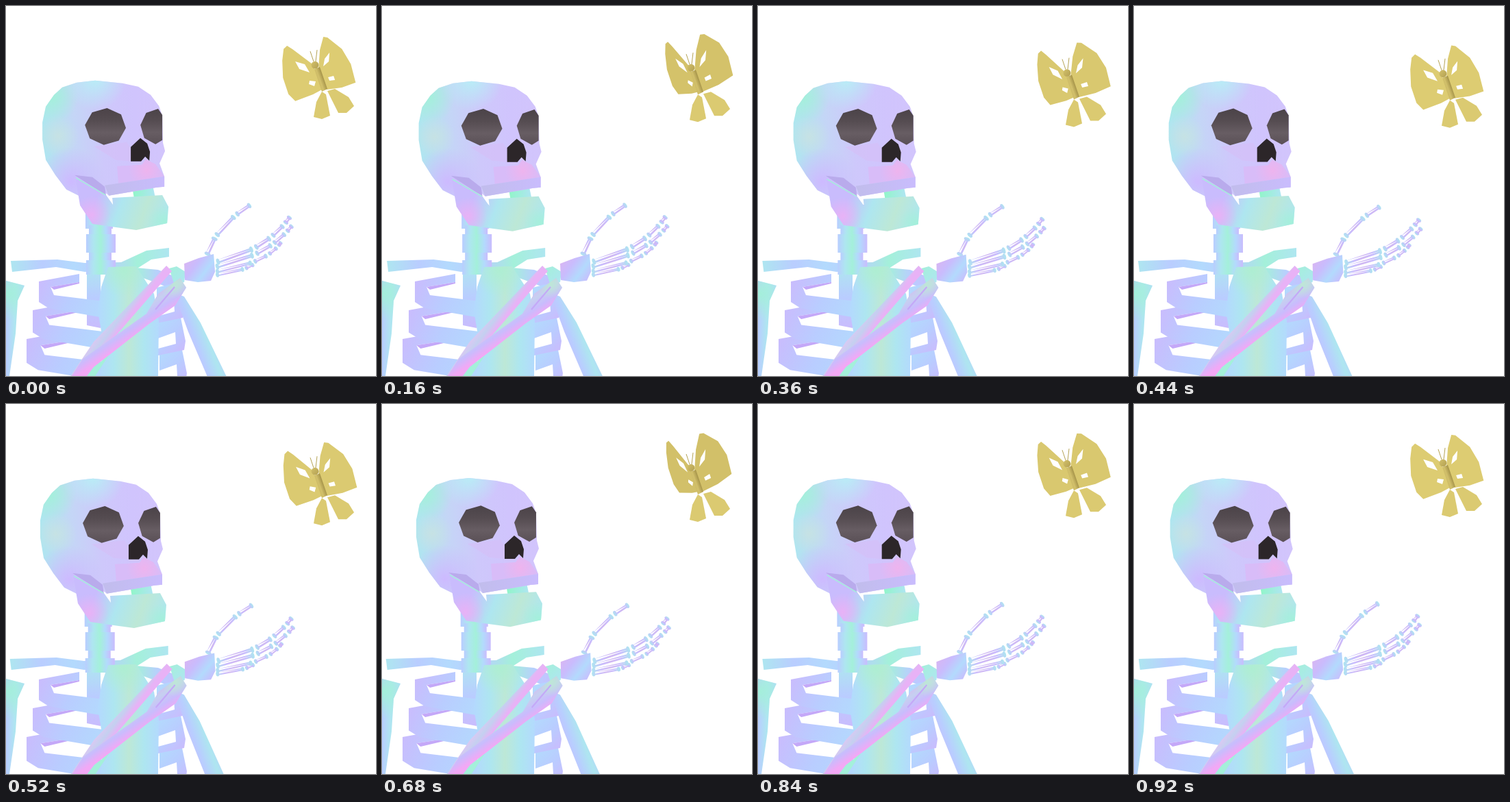
Animation of 540x540 px, one loop 0.96 s. Source, as an HTML page with a canvas:

```html
<!DOCTYPE html>
<html lang="en">
<head>
<meta charset="utf-8">
<title>Skeleton and butterfly</title>
<style>
  html, body { margin: 0; width: 100%; height: 100%; overflow: hidden; background: #fff; }
  canvas { display: block; width: 540px; height: 540px; }
</style>
</head>
<body>
<canvas id="stage" width="540" height="540"></canvas>
<script>
const ctx = document.getElementById('stage').getContext('2d');
const LOOP = 960, STEP = 40, TAU = 2 * Math.PI;
const mint = '#a4f0da', cyan = '#aee6f0', sky = '#b3dafd', blue = '#b9cdff',
  lilac = '#c9bcfd', violet = '#c4a8f8', pink = '#e8b2f6', sage = '#bde8d6';

const points = s => s.split(' ').map(p => p.split(',').map(Number));
const wave = (t, peak, period = LOOP) => Math.cos(TAU * (t - peak) / period);

function lin(x0, y0, x1, y1, ...colors) {
  const g = ctx.createLinearGradient(x0, y0, x1, y1);
  colors.forEach((c, i) => g.addColorStop(i / (colors.length - 1), c));
  return g;
}

function trace(pts) {
  pts.forEach(([x, y], i) => i ? ctx.lineTo(x, y) : ctx.moveTo(x, y));
  ctx.closePath();
}

function glow(x, y, r, c) {
  const g = ctx.createRadialGradient(x, y, 0, x, y, r);
  g.addColorStop(0, c);
  g.addColorStop(1, c + '00');
  ctx.fillStyle = g;
  ctx.fillRect(x - r, y - r, 2 * r, 2 * r);
}

// Polygon with a base fill and soft glows [x, y, radius, color] inside it.
function poly(shape, fill, ...glows) {
  ctx.save();
  ctx.beginPath();
  trace(typeof shape === 'string' ? points(shape) : shape);
  ctx.fillStyle = fill;
  ctx.fill();
  ctx.clip();
  glows.forEach(g => glow(...g));
  ctx.restore();
}

function layer(draw, dx = 0, dy = 0, angle = 0, cx = 0, cy = 0) {
  ctx.save();
  ctx.translate(cx + dx, cy + dy);
  ctx.rotate(angle);
  ctx.translate(-cx, -cy);
  draw();
  ctx.restore();
}

function line(x0, y0, x1, y1, w, c) {
  ctx.beginPath();
  ctx.moveTo(x0, y0);
  ctx.lineTo(x1, y1);
  ctx.lineWidth = w;
  ctx.strokeStyle = c;
  ctx.stroke();
}

function leftRib(i) {
  layer(() => {
    ctx.scale(1 + i * .1, 1 + i * .08);
    poly('0,0 59,-11 59,1 17,8 22,20 95,29 95,53 14,39 0,30', lin(0, 0, 95, 45, lilac, blue, sky));
    poly('17,8 59,1 59,3 22,12', violet);
  }, 48 - 9 * i, 402 + 42 * i);
}

function rightRib(i) {
  layer(() => poly('0,8 32,0 40,39 38,52 0,60 0,50 26,43 25,26 0,35', lin(0, 10, 40, 50, sky, blue, lilac)),
    222 - 2 * (1 - i), 403 + 47 * i);
}

function torso() {
  poly('0,401 27,408 17,430 14,478 5,540 0,540', lin(0, 0, 26, 0, blue, cyan, sky), [3, 420, 40, mint]);
  poly('118,378 138,378 138,470 118,466', lin(0, 380, 0, 470, cyan, blue, lilac));
  poly('190,382 222,385 254,398 258,420 222,405 192,394', lin(190, 0, 258, 0, mint, blue, lilac));
  for (let i = 2; i >= 0; i--) {
    rightRib(i);
    leftRib(i);
  }
}

function neck() {
  poly('7,372 75,370 115,375 168,374 205,357 238,353 238,366 212,370 190,384 115,388 73,381 9,388',
    lin(7, 0, 238, 0, cyan, blue, sky, blue, mint, cyan));
  const bone = (x, y, w, h) => poly([[x, y], [x + w, y], [x + w, y + h], [x, y + h]],
    lin(x, 0, x + w, 0, blue, cyan, mint, sky, lilac));
  bone(116, 290, 40, 35);
  for (let i = 0; i < 2; i++) bone(121, 320 + 38 * i, 33, 15);
  for (let i = 0; i < 2; i++) bone(117, 333 + 38 * i, 43, 27 - 6 * i);
}

function sternum() {
  poly('149,381 190,380 216,420 223,460 222,540 138,540 143,498 134,445 139,410',
    lin(136, 0, 223, 0, sky, cyan, sage, cyan, sky), [172, 385, 40, '#aeeed2']);
}

function upperArm() {
  poly('241,417 260,424 284,462 322,540 294,540 266,475 252,437', lin(252, 470, 300, 452, lilac, blue, cyan, blue));
}

function forearm() {
  poly('238,383 249,380 262,388 260,403 246,408', lin(238, 380, 262, 400, mint, cyan));
  poly('234,379 242,387 150,493 110,540 94,540 128,490', lin(150, 444, 174, 462, lilac, '#d9c9f3', '#c4d0f0', pink));
  poly('254,397 263,411 247,437 210,463 128,527 118,540 96,540 112,515 205,449 222,420',
    lin(172, 446, 194, 478, '#d4b9f2', '#c6d0f0', lilac, '#f2a8f5'), [246, 405, 22, sage]);
  line(246, 410, 218, 443, 2, violet);
  poly('128,527 150,510 130,540 118,540', mint);
}

// Finger bone: slim shaft with wider pale ends.
function phalanx([x0, y0], [x1, y1], w) {
  const len = Math.hypot(x1 - x0, y1 - y0);
  layer(() => {
    ctx.beginPath();
    ctx.rect(1, -w * .36, len - 2, w * .72);
    for (const x of [2.5, len - 2.5]) ctx.ellipse(x, 0, 2.5, w * .62, 0, 0, TAU);
    ctx.fillStyle = lin(0, 0, len, 0, cyan, lilac, '#d0b8f2', lilac, cyan);
    ctx.fill();
  }, x0, y0, Math.atan2(y1 - y0, x1 - x0));
}

// Bones follow a quadratic curve, split at the joints.
function finger(curve, joints, w) {
  const [a, b, c] = points(curve);
  const at = u => [0, 1].map(k => (1 - u) ** 2 * a[k] + 2 * u * (1 - u) * b[k] + u * u * c[k]);
  for (let i = 1; i < joints.length; i++) {
    phalanx(at(joints[i - 1] + (i > 1 ? .025 : 0)), at(joints[i]), w - i * .4);
  }
}

function hand() {
  const joints = [0, .4, .64, .86, 1];
  finger('306,393 345,388 362,377', [0, .65, 1], 6);
  finger('306,388 384,375 402,344', joints, 6.6);
  finger('306,381 384,365 418,320', joints, 7.6);
  finger('307,374 382,356 415,307', joints, 8);
  finger('293,364 305,322 357,290', [0, .33, .75, 1], 8);
  poly('260,376 281,368 303,362 305,388 299,401 280,403 261,400', lin(262, 370, 302, 400, '#d9b5f2', lilac, sky, lilac));
}

function tongue() {
  poly('185,270 214,262 218,281 187,282', lin(185, 0, 216, 0, '#91f5c9', cyan));
}

function jaw() {
  poly('101,250 114,256 146,276 156,290 155,280 228,276 237,293 235,317 190,327 153,322 126,318 108,291',
    lin(102, 260, 236, 310, lilac, lilac, cyan, sage, cyan), [125, 305, 28, pink], [232, 316, 26, mint]);
  line(102, 251, 145, 276, 1.5, mint);
}

function socket(cx, cy, rx, ry, right = 540) {
  const pts = Array.from({ length: 8 }, (_, i) => {
    const a = TAU * i / 8 + .08;
    return [Math.min(cx + rx * Math.cos(a), right), cy + ry * Math.sin(a)];
  });
  poly(pts, lin(0, cy - ry, 0, cy + ry, '#4b4348', '#554c51', '#675d63', '#5a5056'));
}

function skull() {
  poly('53,195 53,170 58,147 70,130 82,119 103,112 130,109 170,113 193,118 211,130 223,146 228,160 229,200 232,212 224,230 231,249 231,264 220,265 150,277 144,272 108,278 88,268 72,247 58,225',
    lin(54, 0, 232, 0, cyan, '#c4d6f6', '#cec8fb', '#d0c4fd', '#d2c5fc'),
    [66, 132, 40, mint], [130, 106, 46, '#b8eef6'], [76, 190, 30, '#c6e2e4'], [95, 256, 50, '#cdbaff']);
  poly('128,205 176,199 184,212 182,227 160,225', '#d6c0f8a0');
  poly('100,247 126,250 144,264 146,277', '#b9abec');
  poly('162,234 198,232 204,224 218,231 231,249 164,259', '#d8bcf8', [205, 240, 26, '#eeb4ee']);
  poly('144,262 231,249 231,264 220,265 150,277', lin(144, 0, 231, 0, '#c1bdec', lilac));
  socket(145, 176, 30, 27);
  socket(220, 176, 24, 26, 228);
  poly('182,206 196,193 206,201 210,213 209,226 203,220 197,227 182,227', '#2c2629');
}

// Wings hinge on the body axis: each point shifts in proportion to its distance out from it.
function wing(parts, side, dx, dy) {
  const nx = .949 * side, ny = -.316 * side;
  ctx.save();
  ctx.translate(459, 107);
  ctx.transform(1 + dx * nx, dy * nx, dx * ny, 1 + dy * ny, 0, 0);
  ctx.translate(-459, -107);
  ctx.beginPath();
  parts.forEach(p => trace(points(p)));
  ctx.fill('evenodd');
  ctx.restore();
}

function butterfly(fold) {
  poly('461,125 467,129 473,160 461,165 449,162 453,140', '#dbca71');
  poly('469,124 480,121 500,133 508,146 497,156 485,156', '#dbca71');
  ctx.fillStyle = `rgb(${221 - 11 * fold},${204 - 12 * fold},${114 - 9 * fold})`;
  wing(['410,58 418,63 446,84 453,97 463,121 448,129 422,139 412,129 404,105 403,80 405,63',
    '422,81 436,85 443,97 428,92', '443,109 452,110 450,117 442,114'], -1, .27 * fold, -.37 * fold);
  wing(['456,92 458,64 463,45 469,46 490,63 503,85 510,112 490,119 468,122',
    '472,68 471,81 463,88 465,77', '470,104 478,102 480,108 472,109'], 1, .11 * Math.sin(Math.PI * fold), -.37 * fold);
  line(449, 81, 444, 66, 1, '#b4a254');
  line(452, 81, 454, 64, 1, '#b4a254');
  poly('450,92 458,89 469,121 461,125', lin(452, 108, 463, 104, '#c8b661', '#d2c06b', '#a8964b'));
  ctx.beginPath();
  ctx.arc(451, 86, 5.4, 0, TAU);
  ctx.fillStyle = lin(446, 82, 456, 90, '#d0be69', '#b5a253');
  ctx.fill();
}

function draw(t) {
  const sway = wave(t, 120), bob = wave(t, 260);
  const swing = (1 - wave(t, 110)) / 2;
  const headX = 2 * sway - 1.3;
  ctx.clearRect(0, 0, 540, 540);
  layer(torso);
  layer(neck, sway * .8 - .6);
  layer(sternum);
  layer(upperArm, 0, 0, .03 * swing, 250, 420);
  layer(forearm, swing * .7);
  layer(hand, swing * .6, swing * .4, .034 * swing - .005, 265, 385);
  layer(tongue, headX, bob);
  layer(skull, headX, bob);
  layer(jaw, headX, 2 * bob + .2);
  const fold = (1 - wave(t, -20, LOOP / 2)) / 2;
  layer(() => butterfly(fold), 0, 6.4 + 6.4 * wave(t, 455));
}

function tick(now) {
  draw(Math.floor(now % LOOP / STEP) * STEP);
  requestAnimationFrame(tick);
}
draw(0);
requestAnimationFrame(tick);
</script>
</body>
</html>
```
